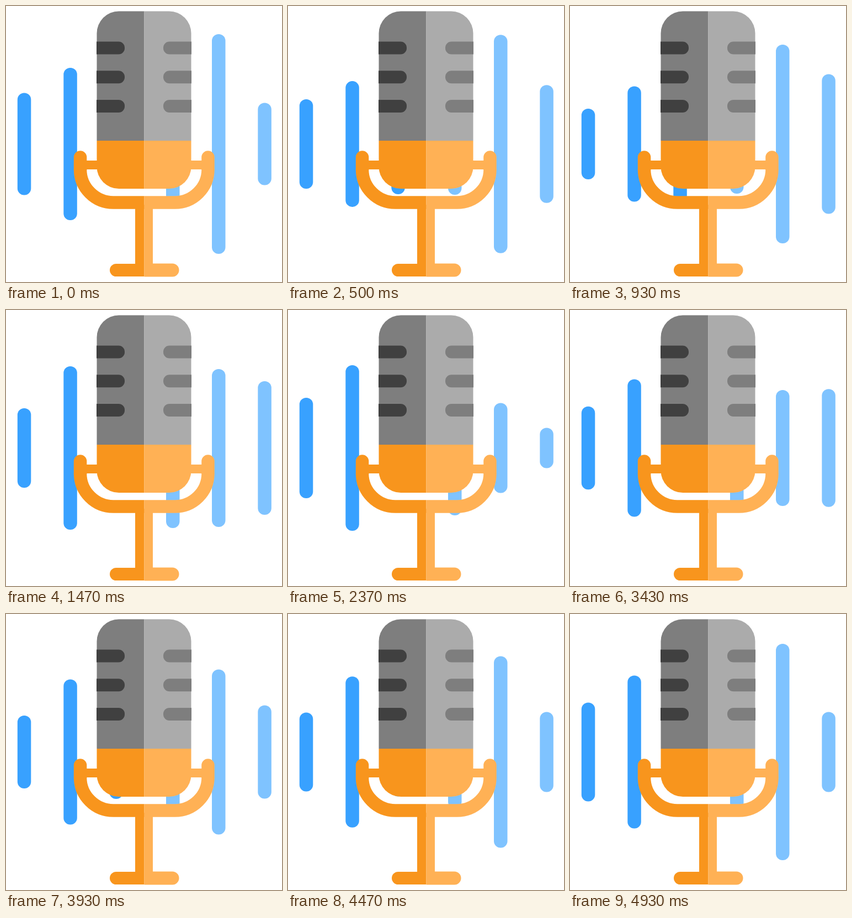
An HTML page for the animation above (4970 ms loop, 500x500 px).

```html
<!DOCTYPE html>
<html lang="en">
<head>
<meta charset="utf-8">
<title>Microphone</title>
<style>
  html, body { margin: 0; width: 100%; height: 100%; overflow: hidden; background: #fff; }
  svg { display: block; width: 100%; height: 100%; }
  .blue { fill: #38a1ff; }
  .sky { fill: #7fc3ff; }
  .dark { fill: #404040; }
  .gray { fill: #7e7e7e; }
  .silver { fill: #ababab; }
  .orange { fill: #f8951d; }
  .amber { fill: #ffb155; }
  .arm { fill: none; stroke-width: 23.5; }
  .arm.left { stroke: #f8951d; }
  .arm.right { stroke: #ffb155; }
</style>
</head>
<body>
<svg viewBox="0 0 500 500">
  <defs>
    <clipPath id="body"><rect x="164.5" y="9.5" width="171" height="321.5" rx="40"/></clipPath>
    <g id="slots">
      <path id="slot" d="M164 64.5H204a11 11 0 0 1 11 11v1a11 11 0 0 1 -11 11H164z"/>
      <use href="#slot" y="52.7"/>
      <use href="#slot" y="105.4"/>
    </g>
  </defs>

  <g id="bars"></g>

  <path class="orange" d="M140 280h30v16h-30z"/>
  <path class="amber" d="M330 280h30v16h-30z"/>
  <path class="arm left" d="M134.5 296A60 60 0 0 0 194.5 356H250.5"/>
  <path class="arm right" d="M366 296A60 60 0 0 1 306 356H250.5"/>
  <path class="orange" d="M122.8 297V274a11.75 11.75 0 0 1 23.5 0V297z"/>
  <path class="amber" d="M354.2 297V274a11.75 11.75 0 0 1 23.5 0V297z"/>

  <path class="orange" d="M234 360H250.5V490H199.5a11.5 11.5 0 0 1 0 -23H234z"/>
  <path class="amber" d="M266 360H250.5V490.5H301.5a12 12 0 0 0 0 -24H266z"/>

  <g clip-path="url(#body)">
    <path class="gray" d="M164 9H250.5V244H164z"/>
    <path class="silver" d="M250.5 9H336V244H250.5z"/>
    <path class="orange" d="M164 244H250.5V332H164z"/>
    <path class="amber" d="M250.5 244H336V332H250.5z"/>
  </g>
  <use href="#slots" class="dark"/>
  <use href="#slots" class="gray" transform="matrix(-1 0 0 1 500 0)"/>
</svg>
<script>
  const LOOP = 4970, STEPS = 149, STEP = 100 / 3, MID = 250, WIDTH = 24.5;

  // Each bar: left edge, then its half height at every key step.
  const keys = [0, 28, 44, 71, 89, 118, 148];
  const bars = [
    [20.8, 92.5, 64, 72, 91, 87, 66, 89.5],
    [104.3, 138, 104.5, 148, 150, 124, 131.5, 138.5],
    [187.3, 70, 105, 75, 60, 65, 85, 71],
    [290, 105, 90, 145, 122, 119, 106, 104],
    [373, 199, 180, 143, 81.5, 71.5, 149.5, 196],
    [456.3, 74.5, 126.5, 121, 36.5, 111, 84.5, 72.5]
  ].map(([x, ...sizes], i) => {
    const el = document.createElementNS("http://www.w3.org/2000/svg", "rect");
    const attrs = { x, width: WIDTH, rx: 12, class: i < 3 ? "blue" : "sky" };
    for (const name in attrs) el.setAttribute(name, attrs[name]);
    document.getElementById("bars").append(el);
    return { el, sizes };
  });

  const count = keys.length;
  const wrap = i => (i + count) % count;
  const span = i => (keys[wrap(i + 1)] - keys[wrap(i)] + STEPS) % STEPS;
  const slope = (v, i) => (v[wrap(i + 1)] - v[wrap(i)]) / span(i);
  const tangent = (v, i) => (slope(v, i - 1) + slope(v, i)) / 2;

  // Smooth periodic curve through the key sizes.
  function sizeAt(v, step) {
    const i = keys.findLastIndex(k => k <= step);
    const h = span(i), u = (step - keys[i]) / h, w = 1 - u;
    return v[i] * w * w * (1 + 2 * u) + v[wrap(i + 1)] * u * u * (1 + 2 * w)
      + h * u * w * (w * tangent(v, i) - u * tangent(v, i + 1));
  }

  function draw(time) {
    const step = Math.floor((time % LOOP + 4) / STEP) % STEPS;
    for (const { el, sizes } of bars) {
      const half = sizeAt(sizes, step);
      el.setAttribute("y", MID - half);
      el.setAttribute("height", 2 * half);
    }
  }

  const start = performance.now();
  function tick() {
    draw(performance.now() - start);
    requestAnimationFrame(tick);
  }
  tick();
</script>
</body>
</html>
```
